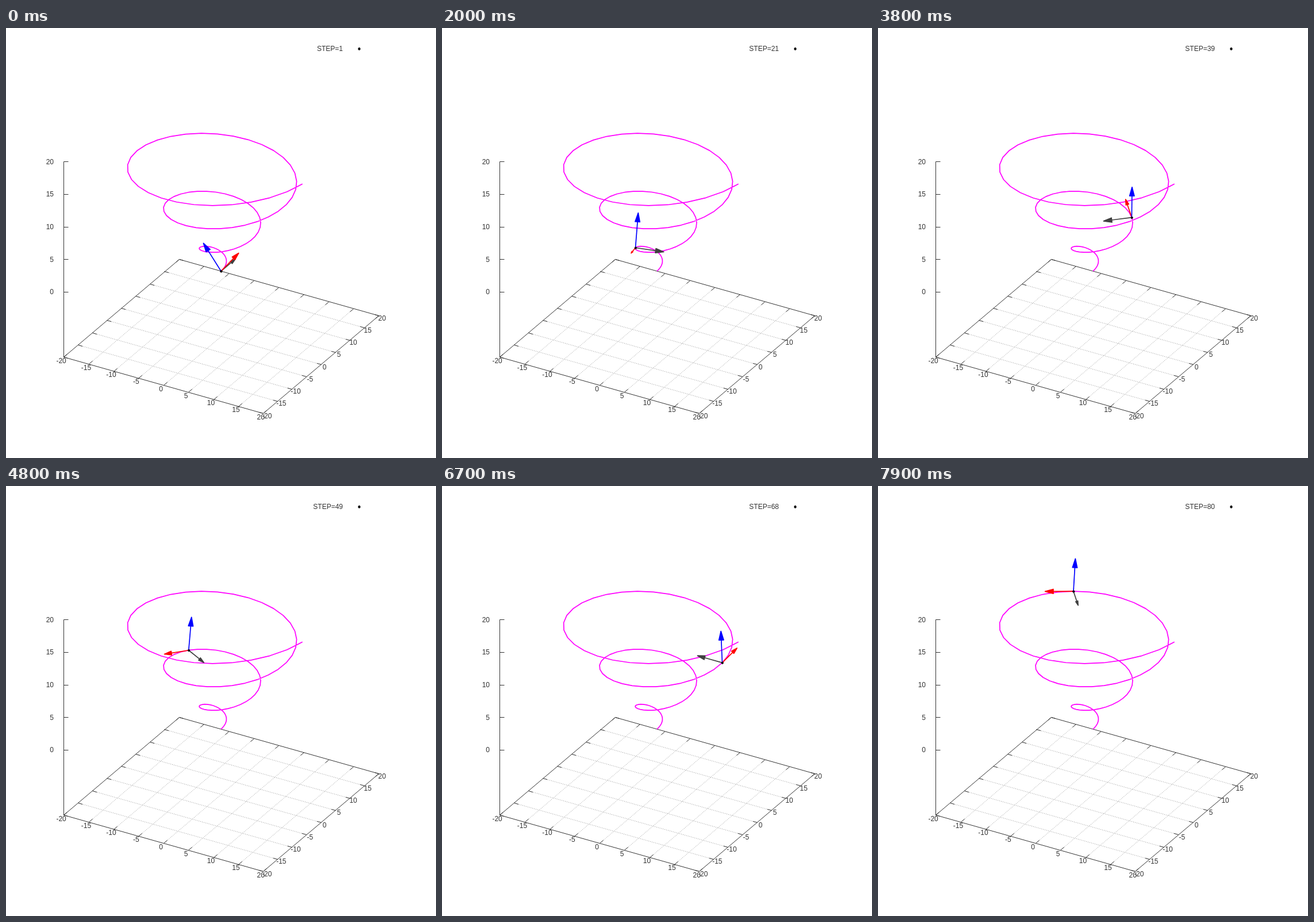
An HTML page that plays this animation: 748x748 px, repeating every 8000 ms.

```html
<!DOCTYPE html>
<html lang="en">
<head>
<meta charset="utf-8">
<title>Moving frame on a conical helix</title>
<style>
  html, body { margin: 0; width: 100%; height: 100%; overflow: hidden; background: #fff; }
  svg { display: block; }
  text { font: 12px "Liberation Sans", Arial, sans-serif; fill: #333; }
  path { fill: none; stroke-linejoin: round; }
</style>
</head>
<body>
<svg id="stage" width="748" height="748" viewBox="0 0 748 748"></svg>
<script>
const stage = document.getElementById('stage');
const LOOP = 8000, STEP_MS = 100;
const DT = 0.06 * Math.PI;
const FLOOR = -10, TIC = 8, ARROW = 5, THICK = 1.7;
const ORIGIN = [374.4, 423.4];
const AXES = [[8.68, 2.45], [5.01, -4.25], [0, -11.33]];
// Two-pixel lines sit half a pixel up and left of one-pixel lines
const SHIFT = 'translate(-0.3 -0.4)';

function add(tag, attrs, text = '') {
  const el = document.createElementNS('http://www.w3.org/2000/svg', tag);
  for (const name in attrs) el.setAttribute(name, attrs[name]);
  el.textContent = text;
  return stage.appendChild(el);
}

const project = p => ORIGIN.map((o, i) => o + p.reduce((sum, v, k) => sum + v * AXES[k][i], 0));
const unit2 = ([x, y]) => [x / Math.hypot(x, y), y / Math.hypot(x, y)];
const polyline = points => 'M' + points.map(p => p.map(v => v.toFixed(2)).join(' ')).join('L');
const snap = p => p.map(v => Math.floor(v) + 0.5);
const segment = (a, b) => polyline([snap(project(a)), snap(project(b))]);
const tic = (p, [dx, dy], len) => {
  const [x, y] = snap(p);
  return polyline([[x, y], [x + dx * len, y + dy * len]]);
};
const label = (x, y, value, anchor) =>
  add('text', { x, y: Math.round(y), 'text-anchor': anchor }, value);

function drawAxes() {
  const xDir = unit2(AXES[0]), yDir = unit2(AXES[1]);
  let grid = '', frame = '';
  for (let v = -20; v <= 20; v += 5) {
    const alongY = segment([v, -20, FLOOR], [v, 20, FLOOR]);
    const alongX = segment([-20, v, FLOOR], [20, v, FLOOR]);
    if (Math.abs(v) === 20) frame += alongY + alongX;
    else grid += alongY + alongX;

    const front = project([v, -20, FLOOR]), back = project([v, 20, FLOOR]);
    const left = project([-20, v, FLOOR]), right = project([20, v, FLOOR]);
    frame += tic(front, yDir, TIC) + tic(back, yDir, -TIC);
    frame += tic(left, xDir, TIC) + tic(right, xDir, -TIC);
    label(front[0] - 4.5, front[1] + 9.8, v, 'middle');
    label(right[0] + 6, right[1] + 8, v, 'middle');

    if (v >= 0) {
      const side = project([-20, -20, v]);
      frame += tic(side, [1, 0], TIC);
      label(83, side[1] + 4, v, 'end');
    }
  }
  frame += segment([-20, -20, FLOOR], [-20, -20, 20]);
  add('path', { d: grid, stroke: '#909090', 'stroke-dasharray': '1 2' });
  add('path', { d: frame, stroke: '#333' });
}

const helix = t => [t * Math.cos(t), t * Math.sin(t), t];
const dot = (a, b) => a.reduce((sum, v, i) => sum + v * b[i], 0);
const normalize = a => a.map(v => v / Math.sqrt(dot(a, a)));
const cross = ([a, b, c], [d, e, f]) => [b * f - c * e, c * d - a * f, a * e - b * d];

// Normal, tangent and binormal of the helix, in drawing order
function frenet(t) {
  const c = Math.cos(t), s = Math.sin(t);
  const tangent = normalize([c - t * s, s + t * c, 1]);
  const accel = [-2 * s - t * c, 2 * c - t * s, 0];
  const along = dot(accel, tangent);
  const normal = normalize(accel.map((v, i) => v - along * tangent[i]));
  return [normal, tangent, cross(tangent, normal)];
}

function makeArrow(color) {
  const style = { stroke: color, 'stroke-width': THICK, transform: SHIFT };
  const shaft = add('path', style);
  const head = add('path', { ...style, style: `fill:${color}` });
  return (from, to) => {
    const dx = to[0] - from[0], dy = to[1] - from[1];
    const len = Math.hypot(dx, dy) || 1;
    const size = Math.max(0.3 * TIC, Math.min(0.3 * len, 2 * TIC));
    const ux = dx / len, uy = dy / len;
    const back = size * Math.cos(Math.PI / 12), half = size * Math.sin(Math.PI / 12);
    const base = [to[0] - ux * back, to[1] - uy * back];
    const wing = side => [base[0] - uy * half * side, base[1] + ux * half * side];
    shaft.setAttribute('d', polyline([from, base]));
    head.setAttribute('d', polyline([to, wing(1), wing(-1)]) + 'Z');
  };
}

drawAxes();
const curve = Array.from({ length: 100 }, (_, k) => project(helix(k * DT)));
add('path', { d: polyline(curve), stroke: '#f0f', 'stroke-width': THICK, transform: SHIFT });

const arrows = ['#404040', '#f00', '#00f'].map(makeArrow);
const marker = add('circle', { r: 2.1 });
const caption = label(586, 40, '', 'end');
add('ellipse', { cx: 614.5, cy: 36.2, rx: 2.1, ry: 2.5 });

function render(ms) {
  const index = Math.floor((ms % LOOP) / STEP_MS);
  const t = index * DT;
  const point = helix(t), from = project(point);
  frenet(t).forEach((axis, i) =>
    arrows[i](from, project(point.map((v, k) => v + ARROW * axis[k]))));
  marker.setAttribute('cx', from[0]);
  marker.setAttribute('cy', from[1]);
  caption.textContent = 'STEP=' + (index + 1);
}

let start;
function tick(now) {
  start ??= now;
  render(now - start);
  requestAnimationFrame(tick);
}
render(0);
requestAnimationFrame(tick);
</script>
</body>
</html>
```
